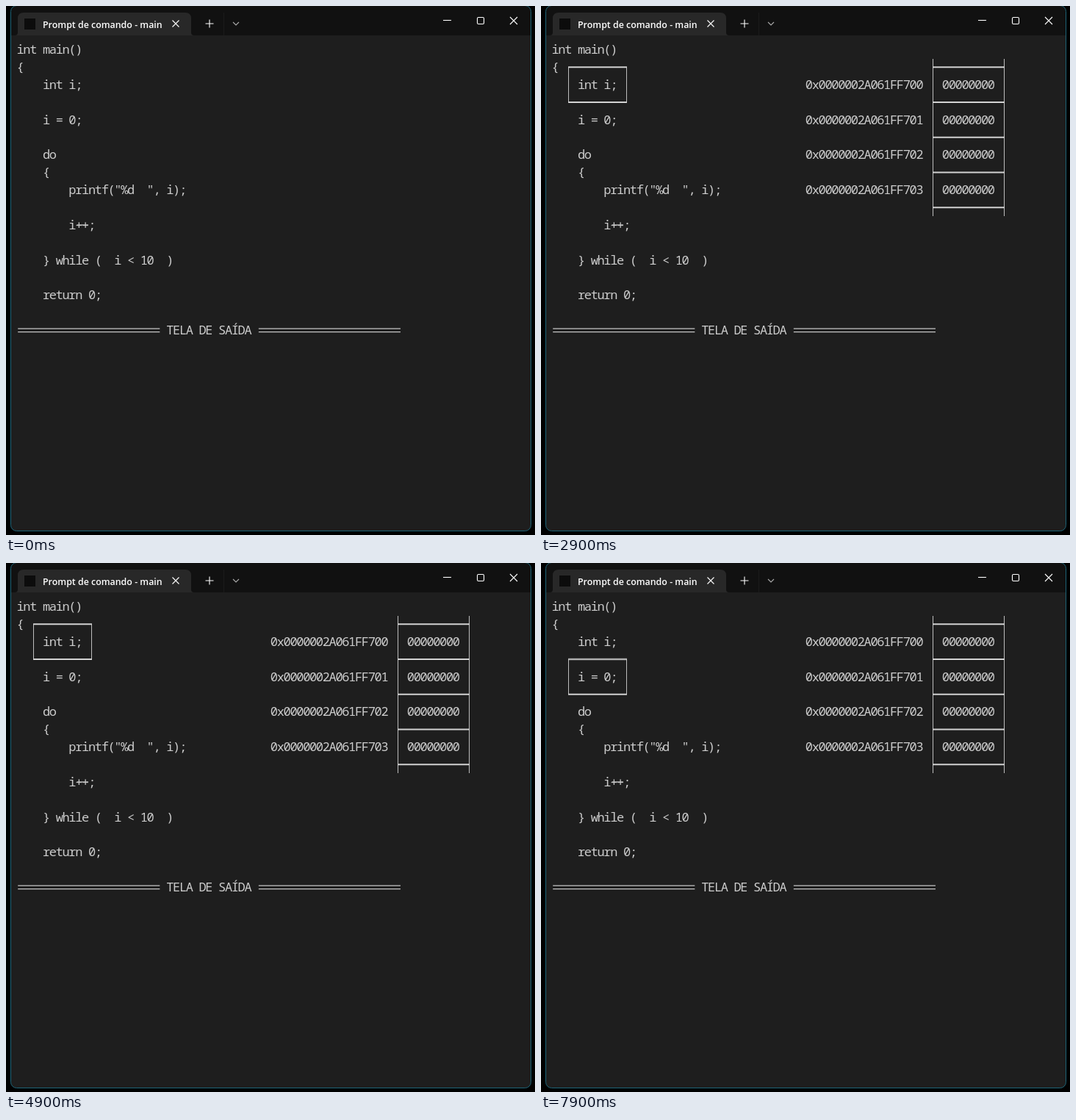
Write an HTML page that moves like this. It is 720 px wide and 720 px high and loops after 8 s.

```html
<!DOCTYPE html>
<html lang="pt">
<head>
<meta charset="utf-8">
<title>Prompt</title>
<style>
  html, body { margin: 0; width: 100%; height: 100%; overflow: hidden; background: #000; }
  svg { display: block; width: 100vw; height: 100vh; }
  .term text {
    font: 400 17px "Noto Sans Mono", "DejaVu Sans Mono", monospace;
    font-stretch: semi-condensed;
    font-variant-ligatures: none;
    fill: #ccc;
    white-space: pre;
  }
  .title { font: 600 12.4px "Open Sans", "Noto Sans", sans-serif; fill: #fff; }
  .icon { fill: none; stroke: #fff; stroke-width: 1.1; }
  .thin { fill: none; stroke: #bdbdbd; stroke-width: 1; }
  .bold { fill: none; stroke: #d2d2d2; stroke-width: 2; }
  .rule { fill: none; stroke: #c4c4c4; stroke-width: 1.3; }
</style>
</head>
<body>
<svg viewBox="0 0 720 720">
  <defs>
    <clipPath id="frame"><rect x="6.5" y="-.5" width="708" height="715" rx="8"/></clipPath>
    <clipPath id="tab"><rect x="48" y="10" width="164" height="28"/></clipPath>
  </defs>
  <g clip-path="url(#frame)">
    <rect width="720" height="720" fill="#1e1e1e"/>
    <rect width="720" height="40" fill="#111"/>
    <path d="M12 40q4 0 4-4V17q0-8 8-8H244q8 0 8 8V36q0 4 4 4z" fill="#282828"/>
    <path d="M296.5 9V40" stroke="#1c1c1c"/>
  </g>
  <rect x="6.5" y="-.5" width="708" height="715" rx="8" fill="none" stroke="#1d6478"/>

  <rect x="25" y="17" width="15" height="15" fill="#0c0c0c"/>
  <g clip-path="url(#tab)"><text class="title" x="50" y="29.5">Prompt de comando - main</text></g>
  <g class="icon">
    <path d="M226.5 19.5l9 9m0-9l-9 9"/>
    <path d="M271.5 24h11m-5.5-5.5v11"/>
    <path d="M309 22l4 4 4-4" stroke="#aaa"/>
    <path d="M595 19.5h11"/>
    <rect x="641.5" y="15.5" width="9" height="9" rx="1.5"/>
    <path d="M686 15l10 10m0-10l-10 10"/>
  </g>

  <g class="term">
    <g id="code"></g>
    <g id="memory"></g>
    <g id="focus"></g>
  </g>
</svg>
<script>
const NS = 'http://www.w3.org/2000/svg';
const LOOP = 8000;
const CELL = 8.855, ROW = 23.875, LEFT = 15.2, BASE = 65.2;
const $ = id => document.getElementById(id);

const colX = c => LEFT + c * CELL;
const midY = r => 59.6 + r * ROW;

function add(parent, tag, attrs, content = '') {
  const el = document.createElementNS(NS, tag);
  for (const k in attrs) el.setAttribute(k, attrs[k]);
  el.textContent = content;
  parent.appendChild(el);
  return el;
}

// Fit the font's own advance to the terminal grid.
const probe = add($('code'), 'text', {}, '0'.repeat(20));
const spacing = CELL - probe.getComputedTextLength() / 20;
probe.remove();

const print = (parent, col, row, str) => add(parent, 'text', {
  x: colX(col) + spacing / 2,
  y: BASE + row * ROW,
  style: `letter-spacing:${spacing}px`
}, str);
const line = (parent, cls, d) => add(parent, 'path', { class: cls, d });

const code = $('code'), memory = $('memory'), focus = $('focus');

[
  [0, 0, 'int main()'], [0, 1, '{'], [4, 2, 'int i;'], [4, 4, 'i = 0;'],
  [4, 6, 'do'], [4, 7, '{'], [8, 8, 'printf("%d  ", i);'], [8, 10, 'i++;'],
  [4, 12, '} while (  i < 10  )'], [4, 14, 'return 0;'], [23, 16, 'TELA DE SAÍDA']
].forEach(([col, row, str]) => print(code, col, row, str));

// Joined plus signs and the double rules beside the heading.
line(code, 'rule', 'M96.5 298H112');
for (const c of [0, 37])
  for (const dy of [-2.5, 2])
    line(code, 'rule', `M${colX(c) + 1} ${midY(16) + dy}H${colX(c + 22) - .7}`);

for (let i = 0; i < 4; i++) {
  print(memory, 39, 2 + 2 * i, '0x0000002A061FF70' + i);
  print(memory, 60, 2 + 2 * i, '00000000');
}
line(memory, 'thin', 'M533.5 72V286M630.5 72V286');
for (let i = 0; i < 5; i++) line(memory, 'bold', `M533 ${midY(1 + 2 * i) - .2}H631`);

line(focus, 'thin', 'M37.5 83V131M116.5 83V131');
for (const r of [1, 3]) line(focus, 'bold', `M37 ${midY(r) - .2}H117`);

function play(el, steps) {
  const frames = steps.map(([ms, props]) => ({ offset: ms / LOOP, easing: 'step-end', ...props }));
  frames.push({ ...frames[frames.length - 1], offset: 1 });
  el.animate(frames, { duration: LOOP, iterations: Infinity }).startTime = 0;
}

const at = (opacity, y = 0) => ({ opacity, transform: `translateY(${y}px)` });
play(memory, [[0, at(0)], [2500, at(1)]]);
play(focus, [[0, at(0)], [2500, at(1)], [6100, at(1, 2 * ROW)]]);
</script>
</body>
</html>
```
